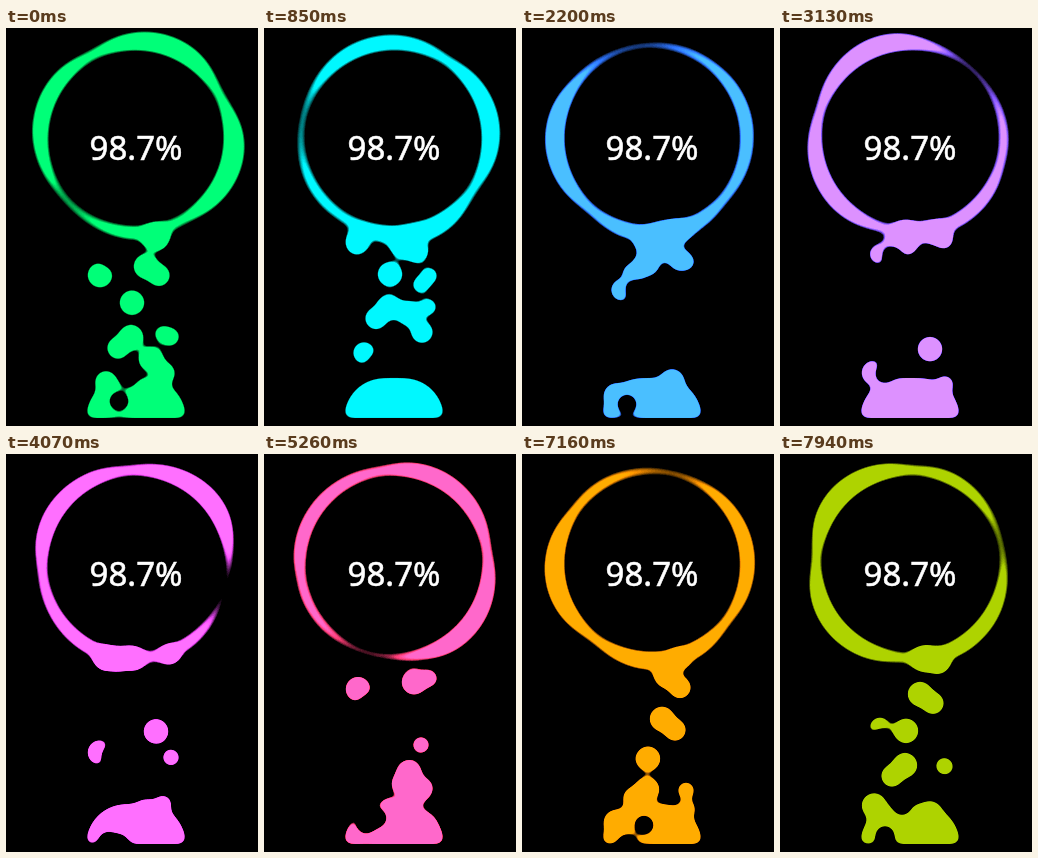
An HTML page that plays this animation: 252x398 px, repeating every 8000 ms.

```html
<!DOCTYPE html>
<html lang="en">
<head>
<meta charset="utf-8">
<title>Charging</title>
<style>
  html, body { margin: 0; width: 100%; height: 100%; overflow: hidden; background: #000; }
  body { position: relative; --t: 0s; }

  .goo {
    position: absolute; left: -20px; top: -10px; width: 300px; height: 400px;
    overflow: hidden; background: #000;
    animation: hue 10s linear calc(-.86s - var(--t)) infinite paused;
  }
  .ring { position: relative; width: 300px; height: 300px; filter: blur(8px); }
  .ring::before, .ring::after {
    content: ""; position: absolute; left: 50%; top: 40%;
    transform: translate(-50%, -50%) rotate(0deg);
  }
  .ring::before { z-index: 1; width: 176px; height: 176px; border-radius: 50%; background: #000; }
  .ring::after {
    width: 200px; height: 200px; background: #00ff6f;
    border-radius: 42% 38% 62% 49% / 45%;
    animation: spin 10s linear calc(-.86s - var(--t)) infinite paused;
  }
  .pool {
    position: absolute; left: 100px; bottom: 0; width: 100px; height: 40px;
    border-radius: 100px 100px 0 0; background: #00ff6f; filter: blur(5px);
  }
  .pool i {
    position: absolute; top: 20px; border-radius: 50%; background: #00ff6f;
    transform: translate(-50%, -50%);
    animation: rise var(--period) ease-in-out calc(0s - var(--age) - var(--t)) infinite paused;
  }
  .pool .hole { top: 40px; background: #000; z-index: 1; }

  @keyframes hue {
    from { filter: contrast(10) hue-rotate(0deg); }
    to { filter: contrast(15) hue-rotate(360deg); }
  }
  @keyframes spin {
    50% { border-radius: 45% / 42% 38% 58% 49%; }
    to { transform: translate(-50%, -50%) rotate(720deg); }
  }
  @keyframes rise {
    90% { opacity: 1; }
    to { opacity: .1; transform: translate(-50%, -180px); }
  }

  svg { position: absolute; left: 0; top: 0; }
  text {
    font: 33px "Noto Sans", "Open Sans", sans-serif; text-anchor: middle;
    fill: #fff; stroke: #fff; stroke-width: .6px;
  }
</style>
</head>
<body>
<div class="goo">
  <div class="ring"></div>
  <div class="pool"></div>
</div>
<svg width="252" height="398">
  <text x="130" y="132">98.7%</text>
  <circle id="pointer" cx="243" cy="396" r="10" fill="none" stroke="#333" stroke-width="1.5"/>
</svg>
<script>
  const LOOP = 8000;
  const BIG = 26, MEDIUM = 23, SMALL = 18;
  const pool = document.querySelector('.pool');
  const pointer = document.getElementById('pointer');

  // x is measured inside the pool; age is how long the bubble has been rising at t = 0
  function bubble(x, period, age, size = BIG, className = '') {
    const el = document.createElement('i');
    el.className = className;
    el.style.cssText =
      `left:${x}px;width:${size}px;height:${size}px;--period:${period}s;--age:${age}s`;
    pool.append(el);
  }

  // The smaller follower trails a little, further from the middle
  function pair(x, period, age) {
    bubble(x, period, age);
    bubble(x + 13 * Math.sign(x - 50), period, age - .34, MEDIUM);
  }

  const drop = (x, period, age) => bubble(x, period, age, SMALL);
  const hole = (x, period, age) => bubble(x, period, age, 21, 'hole');

  pair(60, 8, 5.45);
  pair(65, 5, 1.67);
  pair(45, 8, 3.36);
  bubble(46, 8, 4.33);
  bubble(70, 6, 5.12);
  bubble(14, 5, 3.22);
  bubble(20, 6, 1.3, MEDIUM);
  drop(84, 8, 3.3);
  drop(77, 5, 2.13);
  drop(85, 4, 1.67);

  hole(25, 6, 5);
  hole(22, 8, 4.65);
  hole(33, 5, 1.1);
  hole(42, 8, 2.7);

  const origin = performance.now();
  function draw() {
    const t = (performance.now() - origin) % LOOP;
    document.body.style.setProperty('--t', t / 1000 + 's');
    pointer.style.display = t > 6390 && t < 6530 ? '' : 'none';
    requestAnimationFrame(draw);
  }
  draw();
</script>
</body>
</html>
```
